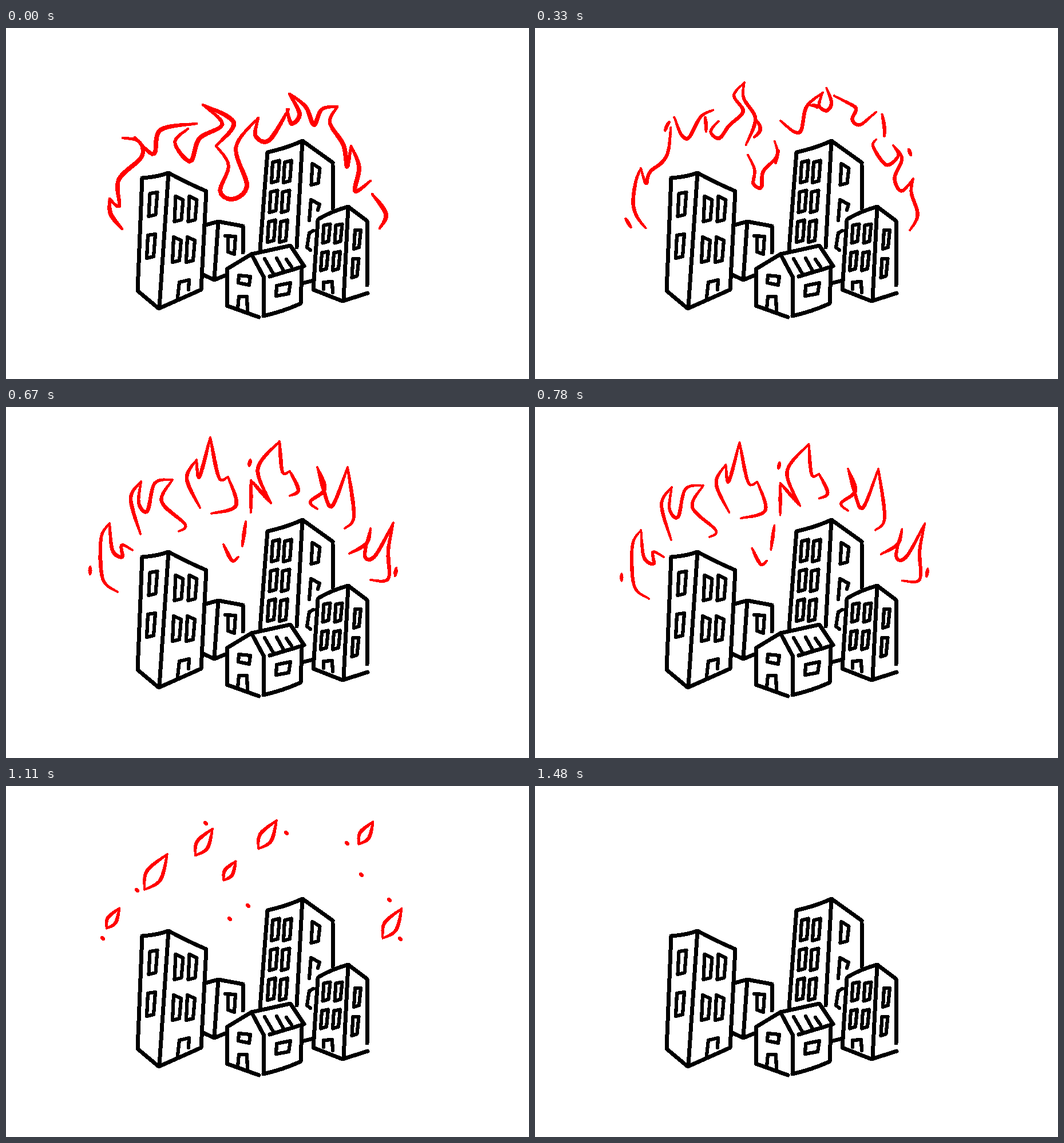
Recreate the animation shown at these times as an HTML page. Size 914x613 px, loop 1.97 s.

```html
<!DOCTYPE html>
<html lang="en">
<head>
<meta charset="utf-8">
<title>City on fire</title>
<style>
html, body { margin: 0; width: 100%; height: 100%; overflow: hidden; background: #fff; }
svg { display: block; width: 100%; height: 100%; }
path { fill: none; stroke-linecap: round; stroke-linejoin: round; shape-rendering: crispEdges; }
#city { stroke: #000; stroke-width: 7; }
#windows { stroke-width: 6.2; }
#fire { stroke: #f00; }
</style>
</head>
<body>
<svg viewBox="0 0 914 613">
  <g id="fire"></g>
  <g id="city">
    <path d="M238 262Q265 260 284 253Q315 270 350 285L341 457L267 490L230 459ZM284 253Q277 350 268 488"/>
    <path d="M349 344L371 338L414 346V392M371 338L364 439M347 432L364 440L386 431"/>
    <path d="M444 387L457 217Q490 210 518 197L571 235M571 240V315M518 197L508 383M517 446L537 441"/>
    <path d="M545 336L537 457L588 477L632 463M547 333Q572 319 598 312L631 337V449M598 312L590 475"/>
    <path d="M442 505L386 485V421L429 395L451 436L450 503Q488 494 515 481L517 423M429 395L497 380L521 416L461 434"/>
    <g id="windows">
      <path d="M300 471L303 444L320 440L319 457M383 363L401 364L399 395L388 391V366"/>
      <path d="M530 336L533 300L548 308L545 318M537 354L530 358L526 383L532 388M555 456V444L570 443L571 462"/>
      <path d="M452 403L467 429M473 402L484 422M490 404L499 417"/>
      <path d="M407 432L427 434L425 449L406 445ZM405 490L407 469H421L422 494M473 450L497 445L494 464L472 468Z"/>
    </g>
  </g>
</svg>
<script>
const LOOP = 1970, N = 40;
const STEPS = [0, 110, 220, 330, 450, 560, 670, 780, 890, 1000, 1110, 1220, 1310, 1390, 1480];
const POSES = [0, .5, 1, 1.33, 1.67, 2, 3, 3.5, 4, 4.5, 5, 5.3, 5.55, 5.8, 6];
const WEIGHTS = [8, 7.2, 5.8, 6.8, 5.8, 6.4, 6.4];
const lerp = (a, b, t) => a + (b - a) * t;
const mix = (p, q, t) => p.map((c, k) => lerp(c, q[k], t));
const points = text => text.trim().split(/\s+/).map(s => s.split(',').map(parseFloat));

// Rows of windows on one wall; each row sits a little further left.
function grid(cx, cy, w, h, slope, cols, rows, dx, dy) {
  let d = '';
  for (let r = 0; r < rows; r++) {
    for (let c = 0; c < cols; c++) {
      const x = cx - w / 2 + c * dx - r * 3.5, y = cy - h / 2 + r * dy;
      d += `M${x + 1} ${y - slope}L${x + w + 1} ${y + slope}` +
        `L${x + w - 2} ${y + h - 2}L${x - 1} ${y + h + 1}Z`;
    }
  }
  const path = document.createElementNS('http://www.w3.org/2000/svg', 'path');
  path.setAttribute('d', d);
  document.getElementById('windows').append(path);
}
grid(257, 308, 13, 40, -1, 1, 2, 0, 73);
grid(302, 317, 13, 40, 3, 2, 2, 24, 71);
grid(471, 251, 12, 36, -1.5, 2, 3, 21, 52);
grid(541, 257, 13, 32, 4, 1, 1, 0, 0);
grid(560, 359, 11, 31, -1, 2, 2, 21, 48);
grid(614, 369, 10, 32, 0, 1, 2, 0, 50);

// Smooth curve through a few points, sampled evenly along its length.
function curve(p) {
  const at = i => p[Math.max(0, Math.min(p.length - 1, i))];
  const fine = [], dist = [0];
  for (let i = 0; i < p.length - 1; i++) {
    for (let k = 0; k <= 16; k++) {
      const t = k / 16;
      fine.push([0, 1].map(c => {
        const [a, b, d, e] = [-1, 0, 1, 2].map(o => at(i + o)[c]);
        return b + t * (d - a + t * (2 * a - 5 * b + 4 * d - e + t * (3 * b - a - 3 * d + e))) / 2;
      }));
    }
  }
  for (let i = 1; i < fine.length; i++) {
    dist[i] = dist[i - 1] + Math.hypot(fine[i][0] - fine[i - 1][0], fine[i][1] - fine[i - 1][1]);
  }
  let j = 1;
  return Array.from({ length: N + 1 }, (_, i) => {
    const d = dist[dist.length - 1] * i / N;
    while (j < fine.length - 1 && dist[j] < d) j++;
    return mix(fine[j - 1], fine[j], (d - dist[j - 1]) / (dist[j] - dist[j - 1] || 1));
  });
}

// One line per flame, left to right: "^" marks a sharp tip, "|" lifts the pen.
function flames(text) {
  return text.trim().split('\n').map(line => line
    .replace(/(\S+)\^/g, '$1 | $1').split('|').map(s => curve(points(s))));
}

const poses = [flames(`
  203,351 183,325 181,298^ 198,311 197,265 237,225 232,198 204,192
  225,191 258,220 270,178 333,167
  318,176 295,200 322,233 338,193 378,168 344,134^ 398,165 367,206
  367,206 389,240 374,285 397,299 421,275 402,208 441,157
  441,157 436,188 460,196 494,142 | 491,142 499,167 513,150 495,115
  496,115 524,138 538,169 552,142 579,137
  579,138 566,165 590,205 596,243 603,206^ 617,243 610,285 637,267 | 640,290 664,325 653,350
`), flames(`
  203,359 175,325 181,264^ 197,295 205,250 237,211 242,155 | 156,326 165,345
  242,157 268,207 295,160 320,148
  318,150 296,185 316,210 340,184 374,155 346,122 370,95^ 370,125 398,165 366,215
  366,215 384,250 381,283 402,290 406,245 438,200 428,162
  428,163 455,185 480,145 510,122 | 508,125 500,150 520,157 530,130 508,95 | 466,140 480,124
  508,95 552,122 541,165 560,187 595,162
  590,165 580,187 608,243 637,225 622,202^ 643,225 622,262 638,288 661,265^ 652,290 665,330 652,357 | 652,209 658,225
`), flames(`
  174,330 163,300 174,230 193,206^ 190,240 212,253 228,212 | 163,346 173,355
  246,153 254,173 275,148 294,134^ 299,172 296,203 | 225,195 230,172 245,152
  326,189 338,140 357,96^ 354,128 374,182^ 382,158 393,180 358,210
  384,235 384,265 400,270 | 433,195 424,220 417,256
  432,161 475,178 461,125 489,94^ 493,132 512,124^ 532,148 517,168
  553,166 575,174 586,130 599,116^ 611,185 592,219
  609,255 635,212^ 640,245 645,279 661,260^ 677,315 662,345
`), flames(`
  195,323 169,300 166,230 181,203^ 186,250 203,262 202,241 221,250 | 147,279 147,292
  235,222 218,160 236,130^ 232,168 247,182 260,133 291,127^ 272,165 313,205 302,217
  339,176 316,125 333,92^ 338,122 357,53^ 372,123 388,122^ 402,172 359,186
  380,240 395,268 406,262 | 419,200 413,243
  428,184 428,128^ 463,168^ 440,108 478,60^ 483,113 496,112^ 511,145 496,155 | 427,92 425,103
  544,178 532,165 557,143 544,105^ 555,145 570,173 597,105^ 608,190 592,212
  600,256 630,238 637,212^ 627,260 645,260 677,202^ 668,250 668,300 637,302 | 682,281 680,295
`)];

// The ring of flames sags on the left and spreads at both ends.
poses[4] = poses[3].map((flame, i) => {
  const dx = 3.5 + 5 * Math.cos(Math.PI * i / 3), dy = 24 - 3.6 * i;
  return flame.map(stroke => stroke.map(([x, y]) => [x + dx, y + dy]));
});
poses[5] = poses[6] = poses[7] = poses[4].map(() => []);

// Centre and length of each leaf-shaped ember, then the sparks.
const embers = points('187,231,42 262,150,74 346,98,56 391,148,40 457,85,59 629,82,47 675,240,62');
const sparks = points('169,266 229,182 349,65 391,232 423,209 490,82 596,100 621,155 670,199 689,267');

function leaf([x, y, size], scale) {
  const tilt = .57, s = size * scale;
  const put = (u, v) => [
    x + s * (u * Math.sin(tilt) + v * Math.cos(tilt)),
    y + s * (v * Math.sin(tilt) - u * Math.cos(tilt))
  ];
  const side = v => curve([put(-.5, 0), put(-.1, v), put(.5, 0)]);
  return [side(-.19), side(.19)];
}

// Strokes shared by both poses bend into each other; others shrink or grow.
function blend(a, b, t) {
  if (a && b) return a.map((p, i) => mix(p, b[i], t));
  const cut = Math.round((a ? t : 1 - t) * N / 2);
  return (a || b).slice(cut, N + 1 - cut);
}

function strokesAt(v) {
  const n = Math.floor(v), t = v - n, out = [];
  poses[n].forEach((flame, i) => {
    const next = poses[n + 1][i];
    const count = t ? Math.max(flame.length, next.length) : flame.length;
    for (let k = 0; k < count; k++) out.push(blend(flame[k], next[k], t));
  });
  const glow = Math.max(0, 1 - Math.abs(v - 5));
  if (glow) {
    embers.forEach(e => out.push(...leaf(e, glow)));
    sparks.forEach(([x, y]) => out.push(curve([[x - 2 * glow, y - 2], [x + 2 * glow, y + 2]])));
  }
  return out;
}

const fire = document.getElementById('fire');
let shown = -1;

function render(time) {
  const step = STEPS.findLastIndex(s => s <= time);
  if (step === shown) return;
  shown = step;
  const v = POSES[step], n = Math.floor(v);
  const weight = lerp(WEIGHTS[n], WEIGHTS[n + 1] || 0, v - n);
  const byWidth = {};
  for (const pts of strokesAt(v)) {
    for (let i = 1; i < pts.length; i++) {
      const taper = .55 + .45 * Math.sin(Math.PI * i / pts.length);
      const width = (Math.round(weight * taper * 2) / 2).toFixed(1);
      const [a, b] = [pts[i - 1], pts[i]].map(p => p.map(c => c.toFixed(1)).join(' '));
      byWidth[width] = (byWidth[width] || '') + `M${a}L${b}`;
    }
  }
  fire.innerHTML = Object.entries(byWidth)
    .map(([w, d]) => `<path stroke-width="${w}" d="${d}"/>`).join('');
}

const start = performance.now();
function tick() {
  render((performance.now() - start) % LOOP);
  requestAnimationFrame(tick);
}
tick();
</script>
</body>
</html>
```
